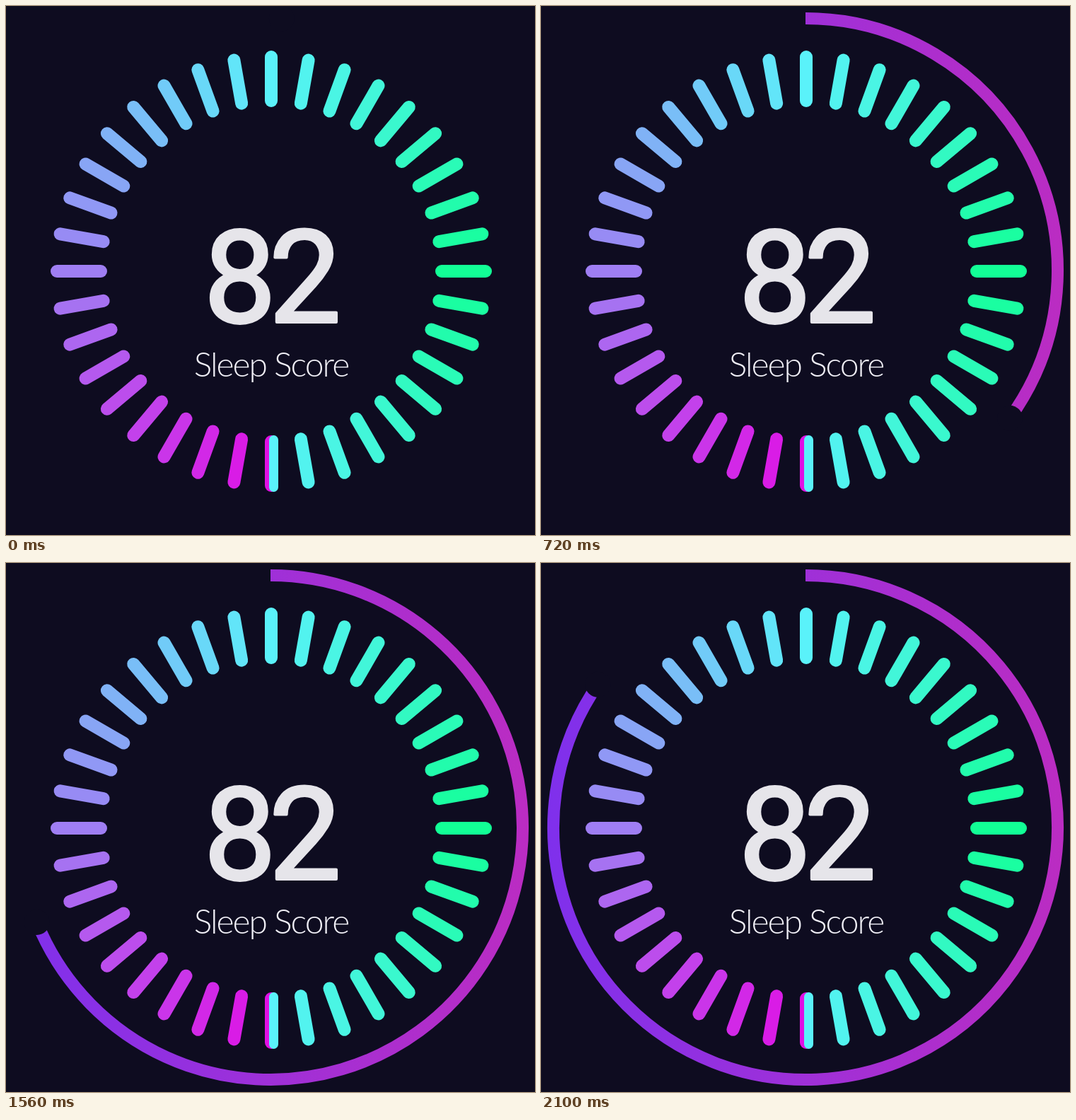
Recreate the animation shown at these times as an HTML page. Size 748 px wide and 748 px high, loop 2.16 s.

```html
<!DOCTYPE html>
<html lang="en">
<head>
<meta charset="utf-8">
<title>Sleep Score</title>
<style>
  html, body { margin: 0; width: 100%; height: 100%; overflow: hidden; background: #0e0c20; }
  svg { display: block; width: 100vw; height: 100vh; }
  line { stroke-linecap: round; }
  .score { font: 400 181px Roboto, "Liberation Sans", sans-serif; fill: #e6e5ea;
           stroke: #e6e5ea; stroke-width: 4; stroke-linejoin: round; }
  .label { font: 300 48px Lato, "Open Sans", sans-serif; letter-spacing: -2px; fill: #f0eff6; }
</style>
</head>
<body>
<svg viewBox="0 0 748 748">
  <defs>
    <linearGradient id="violet" gradientUnits="userSpaceOnUse" x1="9" y1="0" x2="739" y2="0">
      <stop offset="0" stop-color="#7f30ec"/>
      <stop offset=".5" stop-color="#9f30d8"/>
      <stop offset="1" stop-color="#bb2cc2"/>
    </linearGradient>
  </defs>
  <path id="ring" fill="none" stroke="url(#violet)" stroke-width="17"/>
  <circle id="notch" r="18" fill="#0e0c20"/>
  <g id="ticks"></g>
  <text class="score" x="280 372" y="447">82</text>
  <text class="label" x="375" y="524" text-anchor="middle">Sleep Score</text>
</svg>
<script>
const LOOP = 2160, STEP = 60, LAST = LOOP - STEP;
const CENTER = 374, RADIUS = 356.5, SWEEP = 302;
const DIAL = 375, INNER = 241, OUTER = 303;
const CYAN = [90, 242, 250], GREEN = [18, 255, 150];
const PURPLE = [159, 126, 243], MAGENTA = [224, 16, 228];
const $ = id => document.getElementById(id);

// Point at a clockwise angle from twelve o'clock.
function polar(c, r, deg) {
  const a = deg * Math.PI / 180;
  return [c + r * Math.sin(a), c - r * Math.cos(a)];
}

const mix = (from, to, k) =>
  `rgb(${from.map((v, i) => Math.round(v + (to[i] - v) * k))})`;

// Right half: cyan to green and back. Left half: magenta, purple, cyan.
function hue(deg) {
  if (deg < 180) return mix(GREEN, CYAN, Math.abs(deg - 90) / 90);
  return deg < 270 ? mix(MAGENTA, PURPLE, (deg - 180) / 90)
                   : mix(PURPLE, CYAN, (deg - 270) / 90);
}

function tick([x1, y1], [x2, y2], color, width = 18) {
  const line = document.createElementNS("http://www.w3.org/2000/svg", "line");
  Object.entries({ x1, y1, x2, y2, stroke: color, "stroke-width": width })
    .forEach(([k, v]) => line.setAttribute(k, v));
  $("ticks").append(line);
}

for (let deg = 0; deg < 360; deg += 10) {
  tick(polar(DIAL, INNER, deg), polar(DIAL, OUTER, deg), hue(deg));
}
// The right half overlaps the lowest tick.
tick([378.5, 613.5], [378.5, 680.5], mix(CYAN, CYAN, 0), 13);

// Quick start, steady middle, soft end.
const ease = s => s + s * (1 - s) * (0.27 + 1.27 * (s - 0.47) ** 2);

function draw(t) {
  const a = SWEEP * ease(t / LAST);
  const [x, y] = polar(CENTER, RADIUS, a);
  $("ring").setAttribute("d", a > 0
    ? `M${CENTER} ${CENTER - RADIUS}A${RADIUS} ${RADIUS} 0 ${a > 180 ? 1 : 0} 1 ${x} ${y}`
    : "");
  const [cx, cy] = polar(CENTER, RADIUS, a + 2.55);
  $("notch").setAttribute("cx", cx);
  $("notch").setAttribute("cy", cy);
}

const start = performance.now();
function loop() {
  const t = (performance.now() - start) % LOOP;
  draw(Math.floor(t / STEP) * STEP);
  requestAnimationFrame(loop);
}
loop();
</script>
</body>
</html>
```
